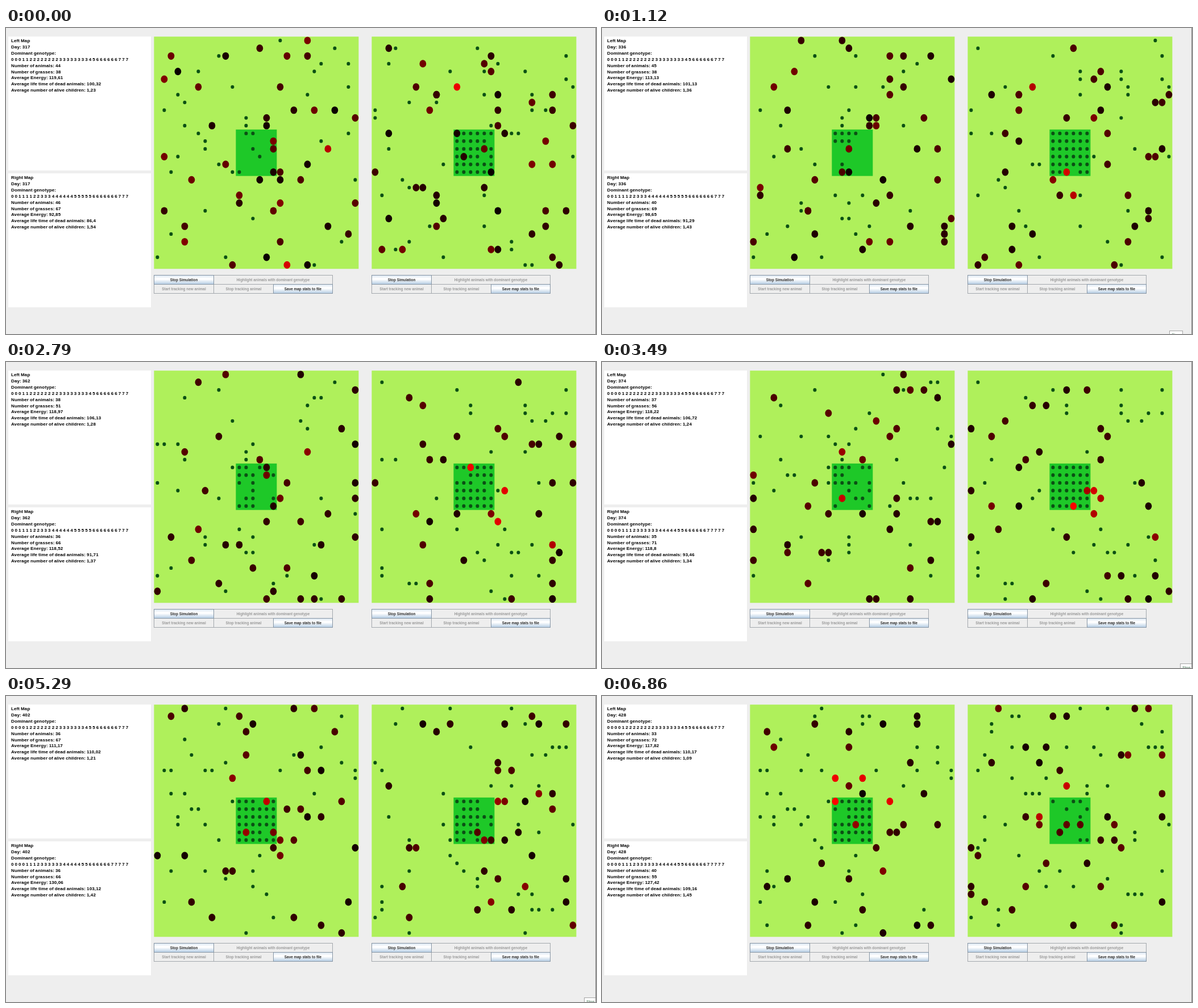
An HTML page with a canvas for the animation above (6940 ms loop, 1038 by 539 pixels).

```html
<!DOCTYPE html>
<html lang="en">
<head>
<meta charset="utf-8">
<title>Evolution maps</title>
<style>
html, body { margin: 0; width: 100%; height: 100%; overflow: hidden; background: #eee; }
body { position: relative; font-family: "Liberation Sans", Arial, sans-serif; font-weight: bold; }
canvas { position: absolute; left: 0; top: 0; }
.edge { position: absolute; left: 1037px; top: 0; width: 1px; height: 539px; background: #858585; }
.stats {
  position: absolute; left: 4px; width: 246px; height: 233px; padding: 3px 0 0 5px; background: #fff;
  white-space: pre; font-size: 8px; line-height: 10.9px; letter-spacing: .12px; word-spacing: -.4px; color: #000;
}
.btn {
  position: absolute; box-sizing: border-box; height: 17px; border: 1px solid #a3a8ad;
  font-size: 6.4px; line-height: 15px; text-align: center; color: #999; white-space: nowrap;
}
.btn.on {
  color: #2b2b2b; border-color: #8795a4;
  background: linear-gradient(#dde8f3, #fff 35%, #fff 45%, #b8cfe5);
}
#tip {
  position: absolute; box-sizing: border-box; width: 24px; height: 20px; border: 1px solid #a5a5a5;
  background: #fff; font: 7px/13px "Liberation Sans", Arial, sans-serif; padding-left: 3px; color: #3a6a4a;
}
#cursor { position: absolute; left: 975px; }
</style>
</head>
<body>
<canvas id="view" width="1038" height="539"></canvas>
<div id="tip">Stop</div>
<div class="edge"></div>
<svg id="cursor" width="8" height="12" viewBox="0 0 8 12">
  <path d="M.5 .5V9L2.5 7.2 3.9 10.6 5.3 10 3.9 6.7H6.6Z" fill="#fff" stroke="#222" stroke-width=".8"/>
</svg>
<script>
const LOOP = 6940, SIZE = 30, CW = 12, CH = 13.635, TOP = 15.2;
const JUNGLE = 12, JUNGLE_SIZE = 6;
const keyTimes = [0, 1120, 2170, 3490, 4560, 6070, 6860];
const keyDays = [317, 336, 353, 374, 391, 415, 428];
const FIRST = 317, LAST = 428, MUTATION = 364;
const ctx = document.getElementById("view").getContext("2d");
const tip = document.getElementById("tip");
const cursor = document.getElementById("cursor");

function random(seed) {
  return () => {
    seed = (seed + 0x6D2B79F5) | 0;
    let t = Math.imul(seed ^ (seed >>> 15), 1 | seed);
    t = (t + Math.imul(t ^ (t >>> 7), 61 | t)) ^ t;
    return ((t ^ (t >>> 14)) >>> 0) / 4294967296;
  };
}

// Piecewise linear lookup
function lerp(xs, ys, x) {
  let i = 0;
  while (i < xs.length - 2 && x >= xs[i + 1]) i++;
  const k = Math.min(1, (x - xs[i]) / (xs[i + 1] - xs[i]));
  return ys[i] + (ys[i + 1] - ys[i]) * k;
}

const wrap = v => (v + SIZE) % SIZE;
const cellOf = (c, r) => r * SIZE + c;
const inBand = v => v >= JUNGLE && v < JUNGLE + JUNGLE_SIZE;
const inJungle = cell => inBand(cell % SIZE) && inBand(Math.floor(cell / SIZE));
const genes = counts => counts.flatMap((n, g) => Array(n).fill(g));
const decimal = v => String(Math.round(v * 100) / 100).replace(".", ",");

function addDiv(className, css, text = "") {
  const el = document.createElement("div");
  el.className = className;
  el.style.cssText = css;
  el.textContent = text;
  document.body.append(el);
  return el;
}

class World {
  constructor(name, x, panelTop, seed, data) {
    Object.assign(this, { name, x, data });
    this.rnd = random(seed);
    this.panel = addDiv("stats", `top:${panelTop}px`);
    this.makeButtons();
    this.simulate();
  }

  makeButtons() {
    const add = (text, dx, top, width, on) =>
      addDiv(on ? "btn on" : "btn", `left:${this.x + dx}px;top:${top}px;width:${width}px`, text);
    add("Highlight animals with dominant genotype", 105, 435, 210);
    add("Start tracking new animal", 0, 451, 106);
    add("Stop tracking animal", 105, 451, 106);
    add("Stop Simulation", 0, 435, 106, true);
    add("Save map stats to file", 210, 451, 105, true);
  }

  at(key, day) { return lerp(keyDays, this.data[key], day); }

  int(n) { return Math.floor(this.rnd() * n); }

  genotype(day) { return genes(this.data.dna[day < MUTATION ? 0 : 1]); }

  newAnimal() {
    const red = this.rnd() < .06 ? 180 + this.int(75) : 10 + 120 * this.rnd();
    return { c: this.int(SIZE), r: this.int(SIZE), dir: this.int(8), red };
  }

  simulate() {
    const plants = new Set();
    let herd = Array.from({ length: this.data.animals[0] }, () => this.newAnimal());
    this.days = [];
    for (let day = FIRST; day <= LAST; day++) {
      if (day > FIRST) herd = this.breed(this.move(herd, plants, day), day);
      const jungle = Math.round(this.at("jungle", day));
      const total = Math.round(this.at("grasses", day));
      const taken = new Set(herd.map(a => cellOf(a.c, a.r)));
      this.sow(plants, taken, true, jungle);
      this.sow(plants, taken, false, total - jungle);
      this.days.push({ herd, plants: [...plants] });
    }
  }

  // Each animal turns by a random gene, steps one cell and eats what grows there
  move(herd, plants, day) {
    const dna = this.genotype(day);
    return herd.map(a => {
      const dir = (a.dir + dna[this.int(dna.length)]) % 8, angle = dir * Math.PI / 4;
      const c = wrap(a.c + Math.round(Math.cos(angle)));
      const r = wrap(a.r + Math.round(Math.sin(angle)));
      const meal = plants.delete(cellOf(c, r)) ? 25 : 0;
      return { c, r, dir, red: Math.min(255, a.red * .98 + meal) };
    });
  }

  breed(herd, day) {
    const size = Math.round(this.at("animals", day));
    const alive = herd.filter(a => a.red > 8).sort((a, b) => b.red - a.red).slice(0, size);
    for (let i = 0; alive.length < size; i++) {
      const parent = alive[i];
      parent.red *= .75;
      alive.push({ c: wrap(parent.c + 1), r: parent.r, dir: this.int(8), red: parent.red * .5 });
    }
    return alive;
  }

  // Brings one zone to the wanted number of plants
  sow(plants, taken, jungle, count) {
    const zone = [...plants].filter(cell => inJungle(cell) === jungle);
    while (zone.length > count) plants.delete(zone.splice(this.int(zone.length), 1)[0]);
    for (let missing = count - zone.length, tries = 0; missing > 0 && tries < 400; tries++) {
      const cell = jungle
        ? cellOf(JUNGLE + this.int(JUNGLE_SIZE), JUNGLE + this.int(JUNGLE_SIZE))
        : this.int(SIZE * SIZE);
      if (inJungle(cell) !== jungle || plants.has(cell) || taken.has(cell)) continue;
      plants.add(cell);
      missing--;
    }
  }

  draw(day) {
    const left = this.x + .4;
    const { herd, plants } = this.days[day - FIRST];
    const dot = (c, r, rx, ry) => {
      ctx.beginPath();
      ctx.ellipse(left + (c + .5) * CW, TOP + (r + .5) * CH, rx, ry, 0, 0, Math.PI * 2);
      ctx.fill();
    };
    const field = (color, start, size) => {
      ctx.fillStyle = color;
      ctx.fillRect(left + start * CW, TOP + start * CH, size * CW, size * CH);
    };
    field("#aff05b", 0, SIZE);
    field("#1ec828", JUNGLE, JUNGLE_SIZE);
    ctx.fillStyle = "#0b5014";
    for (const cell of plants) dot(cell % SIZE, Math.floor(cell / SIZE), 3, 3.2);
    for (const a of herd) {
      ctx.fillStyle = `rgb(${Math.round(a.red)},0,0)`;
      dot(a.c, a.r, 5.9, 6.6);
    }
    this.panel.textContent = [
      this.name,
      "Day: " + day,
      "Dominant genotype:",
      this.genotype(day).join(" "),
      "Number of animals: " + Math.round(this.at("animals", day)),
      "Number of grasses: " + Math.round(this.at("grasses", day)),
      "Average Energy: " + decimal(this.at("energy", day)),
      "Average life time of dead animals: " + decimal(this.at("life", day)),
      "Average number of alive children: " + decimal(this.at("children", day))
    ].join("\n");
  }
}

// Values on the key days; dna counts how often each gene 0 to 7 occurs
const worlds = [
  new World("Left Map", 260, 15, 11, {
    animals: [44, 45, 39, 37, 36, 37, 33],
    grasses: [38, 38, 47, 56, 61, 73, 72],
    jungle: [5, 8, 14, 18, 28, 34, 30],
    energy: [119.61, 113.13, 119.54, 118.22, 120.08, 100.65, 117.82],
    life: [100.32, 101.13, 105.68, 106.72, 109.75, 110.33, 110.17],
    children: [1.23, 1.36, 1.31, 1.24, 1.22, 1.19, 1.09],
    dna: [[3, 2, 8, 8, 1, 1, 6, 3], [4, 1, 8, 7, 1, 2, 6, 3]]
  }),
  new World("Right Map", 643, 256, 29, {
    animals: [46, 40, 36, 35, 31, 41, 40],
    grasses: [67, 69, 63, 71, 71, 61, 55],
    jungle: [30, 34, 28, 34, 31, 17, 8],
    energy: [92.85, 98.65, 118.31, 118.8, 138.94, 119.56, 127.42],
    life: [86.4, 91.29, 90.39, 93.46, 99.41, 107.5, 109.16],
    children: [1.54, 1.43, 1.39, 1.34, 1.39, 1.46, 1.45],
    dna: [[2, 4, 2, 3, 6, 5, 7, 3], [4, 3, 1, 6, 5, 2, 6, 5]]
  })
];

function place(el, on, top, left) {
  el.style.display = on ? "block" : "none";
  el.style.top = top + "px";
  el.style.left = left + "px";
}

function drawPointer(t) {
  const early = t >= 640 && t < 1400, late = t >= 3050 && t < 6600;
  place(tip, early || late, early ? 533 : 531, early ? 998 : 1017);
  place(cursor, t >= 2040 && t < 2800, 526 + Math.max(0, t - 2500) * .045, 975);
}

let shown = 0;
function frame() {
  const t = performance.now() % LOOP;
  const passed = t < 30 ? 0 : Math.max(1, lerp(keyTimes, keyDays, t) - FIRST);
  const day = Math.min(LAST, FIRST + Math.floor(passed + 1e-6));
  if (day !== shown) {
    ctx.clearRect(0, 0, 1038, 539);
    for (const world of worlds) world.draw(day);
    shown = day;
  }
  drawPointer(t);
  requestAnimationFrame(frame);
}
frame();
</script>
</body>
</html>
```
